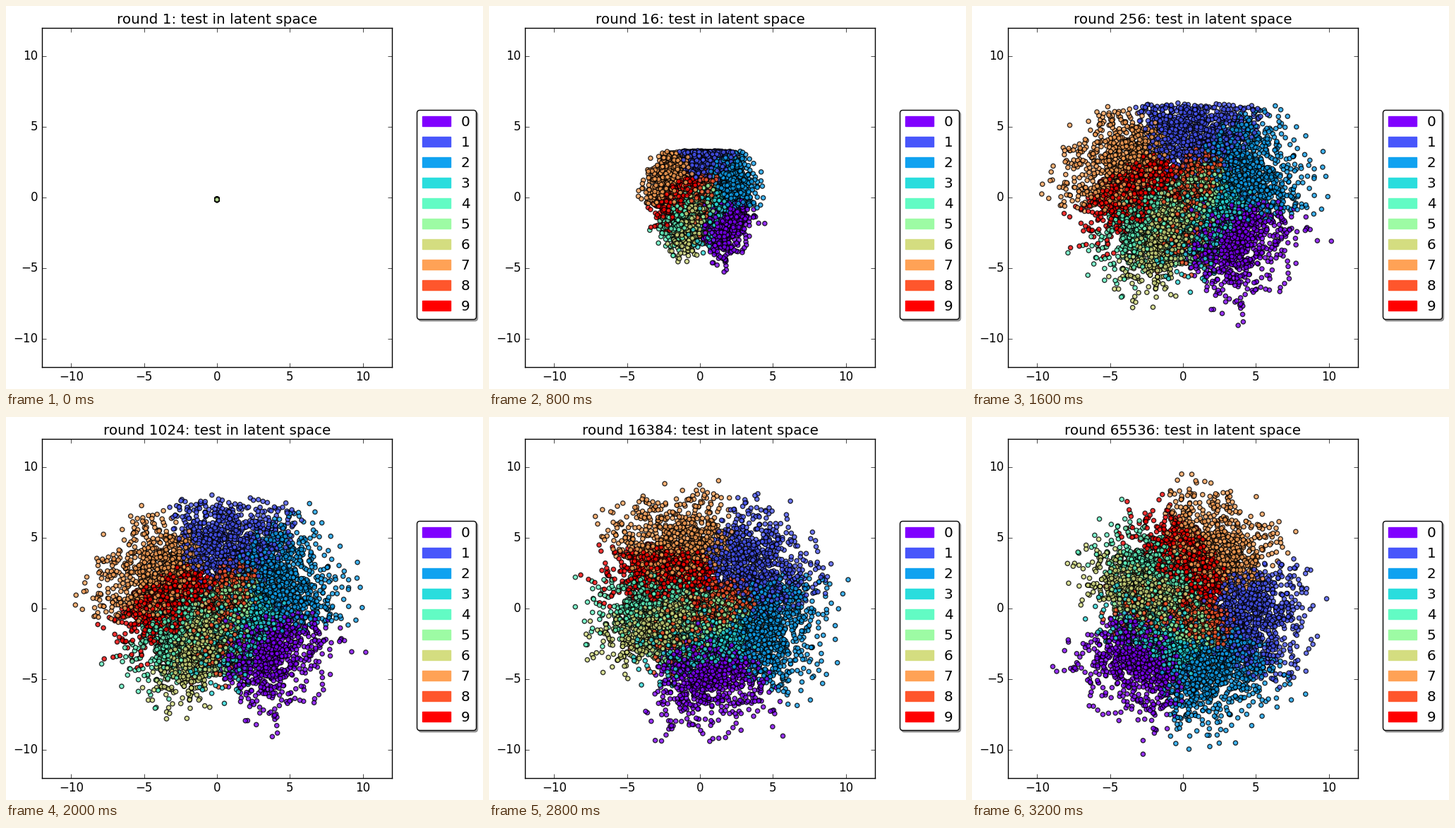
Write a matplotlib script that moves like this. It is 676 px wide and 542 px high and loops after 3400 ms.

```python
import numpy as np
import matplotlib.pyplot as plt
from matplotlib.animation import FuncAnimation
from matplotlib.patches import Patch

plt.style.use("classic")
plt.rcParams.update({"font.family": "DejaVu Sans", "figure.facecolor": "white",
                     "xtick.major.pad": 3.3})

W, H, DPI = 676, 542, 100
FRAMES, INTERVAL = 17, 200
POINTS = 10000

# Outer digits form fans around the centre: digit -> direction in degrees.
FANS = {7: 62, 1: -9, 2: -64, 0: -130}
FAN_RADIUS, FAN_SIZE = 4.8, (1.75, 1.5)
# Inner digits form slanted strips: digit -> centre x, centre y, heading.
STRIPS = {9: (0.4, 3.1, 135), 4: (-1.3, 2.4, 145), 6: (-2.5, 1.2, 160),
          8: (0.4, -0.7, 165), 5: (-0.1, -0.8, 150), 3: (-1.4, -2.1, 145)}
STRIP_SIZE = (0.85, 1.75)

rng = np.random.default_rng(7)


def spread(a, b):
    """Beta noise with zero mean and unit deviation."""
    noise = rng.beta(a, b, POINTS)
    return (noise - noise.mean()) / noise.std()


def digit_shape(digit):
    """Centre, heading, width and depth of one digit's cluster."""
    if digit in FANS:
        heading = np.radians(FANS[digit])
        return (FAN_RADIUS * np.cos(heading), FAN_RADIUS * np.sin(heading),
                heading, *FAN_SIZE)
    x, y, heading = STRIPS[digit]
    return x, y, np.radians(heading), *STRIP_SIZE


def make_cloud():
    """Final layout of all points as complex numbers, with their digits."""
    digits = rng.integers(0, 10, POINTS)
    side, depth = spread(2.3, 2.3), spread(2, 5)
    digits[-1], side[-1], depth[-1] = 6, 0, 0
    shapes = np.array([digit_shape(d) for d in range(10)])
    x, y, heading, width, length = shapes[digits].T
    local = length * depth - 1j * width * side * (1 + .17 * depth)
    cloud = x + 1j * y + local * np.exp(1j * heading)
    strays = rng.random(POINTS) < .08
    strays[-1] = False
    cloud[strays] *= rng.random(strays.sum())
    return cloud, digits


cloud, digits = make_cloud()


def positions(frame):
    turn = 88 * (1 - (max(frame - 11, 0) / 5) ** 1.5)
    turned = cloud * np.exp(1j * np.radians(turn))
    growth = 1 / (1 + np.exp(-1.5 * (frame - 3.8)))
    x = turned.real * growth ** 1.5
    y = turned.imag * growth
    # The top edge is flat at first and rises with every round.
    ceiling = .85 * max(frame, 1)
    y = y / (1 + (np.maximum(y, 0) / ceiling) ** 6) ** (1 / 6)
    return np.column_stack([x, y - .14 * (1 - growth)])


fig = plt.figure(figsize=(W / DPI, H / DPI), dpi=DPI)
ax = fig.add_axes([51 / W, 31 / H, 496 / W, 480 / H])
ax.set(xlim=(-12, 12), ylim=(-12, 12),
       xticks=range(-10, 11, 5), yticks=range(-10, 11, 5))
colors = plt.cm.rainbow(np.linspace(0, 1, 10))
dots = ax.scatter(*positions(0).T, s=20, c=colors[digits],
                  edgecolors="black", linewidths=1, alpha=.8)
title = ax.set_title("", fontsize=14.4, pad=4.4)
ax.legend(handles=[Patch(color=c, label=str(i)) for i, c in enumerate(colors)],
          loc="center left", bbox_to_anchor=(1.05, .45), fontsize=14.4,
          handletextpad=.75, fancybox=True, shadow=True, framealpha=1)


def update(frame):
    dots.set_offsets(positions(frame))
    title.set_text(f"round {2 ** frame}: test in latent space")
    return dots, title


anim = FuncAnimation(fig, update, frames=FRAMES, interval=INTERVAL,
                     repeat=True, repeat_delay=0)
plt.show()
```
